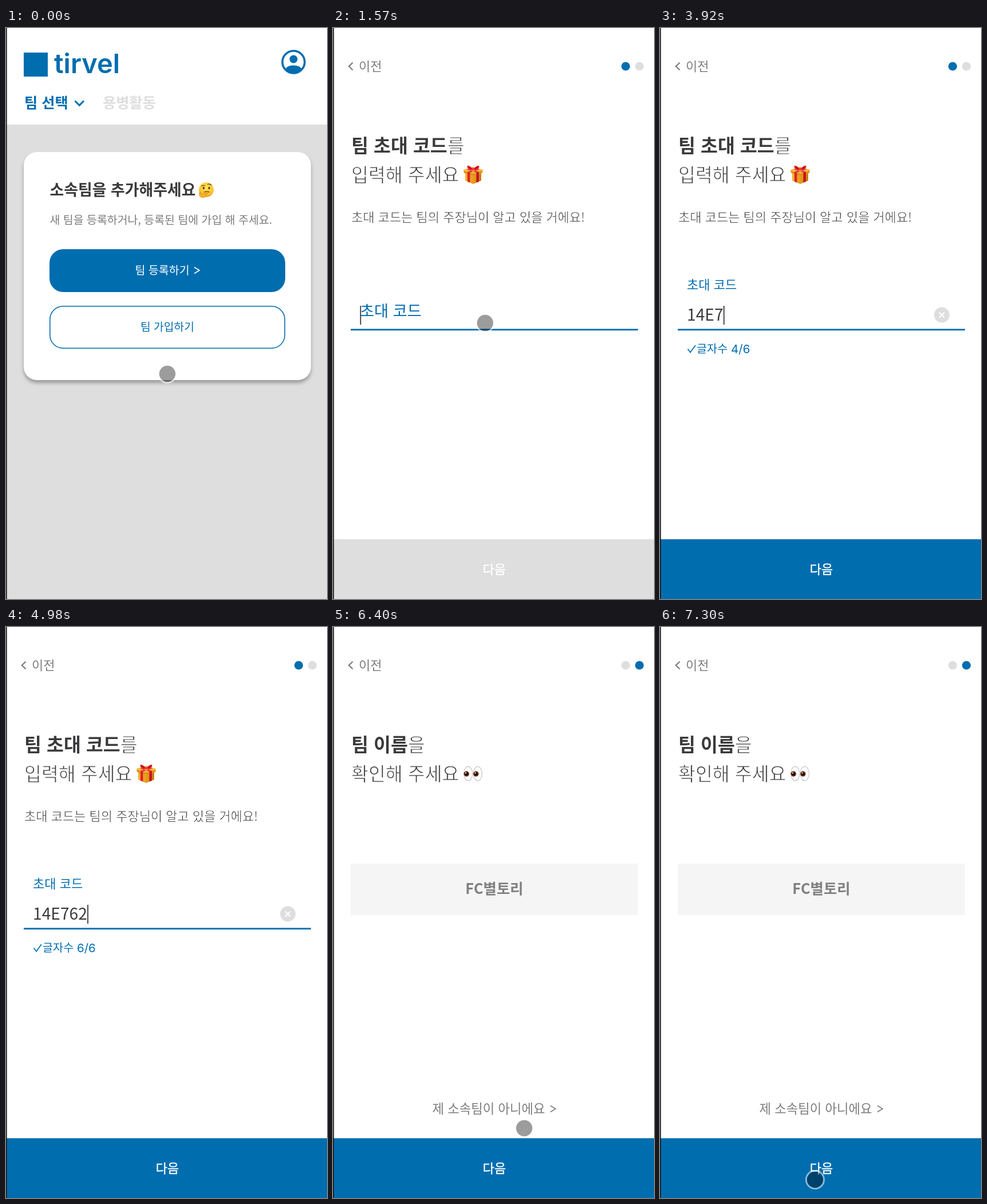
An HTML page for the animation above (8000 ms loop, 561 by 999 pixels).

```html
<!DOCTYPE html>
<html lang="ko">
<head>
<meta charset="utf-8">
<title>팀 가입</title>
<style>
html, body { margin: 0; width: 100%; height: 100%; overflow: hidden; background: #fff; }
svg { display: block; width: 100vw; height: 100vh; }
text { font-family: "Noto Sans CJK KR", "Noto Sans CJK", sans-serif; white-space: pre; }
.num { font-family: Inter, sans-serif; }
.card { filter: drop-shadow(0 5px 3px rgba(0, 0, 0, .3)); }
</style>
</head>
<body>
<svg id="stage" viewBox="0 0 561 999"></svg>
<script>
const LOOP = 8000;
const BLUE = '#006daf', DARK = '#3a3a3c', GRAY = '#7d7d7d', PALE = '#dedede';

// Text placed by its left edge (or centre) and its optical middle line
const label = (str, x, cy, size, fill, weight = 400, extra = '') =>
  `<text x="${x}" y="${cy + size * .375}" font-size="${size}" fill="${fill}" font-weight="${weight}" ${extra}>${str}</text>`;
const mid = (str, cy, size, fill, weight, extra = '') =>
  label(str, 282, cy, size, fill, weight, `text-anchor="middle" ${extra}`);
// A white outline trims regular strokes down to a light weight
const thin = size => `font-weight="400" stroke="#fff" stroke-width="${size * .027}"`;
const line = (d, stroke, width, extra = '') =>
  `<path d="${d}" fill="none" stroke="${stroke}" stroke-width="${width}" ${extra}/>`;
const arrow = (x, y, color) => line(`M${x} ${y - 5.5}L${x + 9} ${y}L${x} ${y + 5.5}`, color, 1.6);
const rect = (x, y, w, h, fill, extra = '') =>
  `<rect x="${x}" y="${y}" width="${w}" height="${h}" fill="${fill}" ${extra}/>`;
const dot = (x, y, r, fill, extra = '') =>
  `<circle cx="${x}" cy="${y}" r="${r}" fill="${fill}" ${extra}/>`;

const defs = `<defs>
  <radialGradient id="skin" cx=".5" cy=".35" r=".65">
    <stop offset="0" stop-color="#ffe45c"/><stop offset=".7" stop-color="#fdc62f"/><stop offset="1" stop-color="#ee9a1c"/>
  </radialGradient>
  <linearGradient id="wrap" x2="1">
    <stop offset="0" stop-color="#f3b32e"/><stop offset=".5" stop-color="#e79d1d"/><stop offset="1" stop-color="#c97a12"/>
  </linearGradient>
</defs>`;

const thinking = `<g transform="translate(350 283)">
  ${dot(0, 0, 12.8, 'url(#skin)')}
  <ellipse cx="-4.5" cy="-3" rx="1.5" ry="2.2" fill="#5b3410"/>
  <ellipse cx="5" cy="-3" rx="1.5" ry="2.2" fill="#5b3410"/>
  ${line('M-8 -6.5Q-5 -8.5 -2 -7M2 -9.5Q6 -11 9 -8', '#7a4a12', 1.3, 'stroke-linecap="round"')}
  ${line('M-3.5 4Q1 2.2 5 4', '#6b3c10', 1.4, 'stroke-linecap="round"')}
  <path d="M-12 5Q-11 2.5 -9.3 5L-8.4 8L1 5.4Q3.5 5.5 2 7.4L-2 9Q0 13 -5 13.5Q-11 14 -12 9Z" fill="#f8b62b" stroke="#d98216" stroke-width=".8"/>
</g>`;

const gift = `<g transform="translate(228 239)">
  <path d="M3 13L17 17L31 13V28L17 34L3 28Z" fill="url(#wrap)"/>
  <path d="M0 9L17 4L34 9L33 14.5L17 20L1 14.5Z" fill="#f6b93a"/>
  <path d="M.5 11L17 16L33.5 11L33 14.5L17 20L1 14.5Z" fill="#dc901c"/>
  <path d="M7 12.5L11.5 14V31.6L7 29.7Z" fill="#e0202a"/>
  <path d="M27 12.5L22.5 14V31.6L27 29.7Z" fill="#c5141e"/>
  <path d="M7 12.5L24 7L28 8.2L11.5 14ZM27 12.5L10 7L6 8.2L22.5 14Z" fill="#ee2f38"/>
  <path d="M17 8Q8 -1 6.5 3Q6 9 17 9Q28 9 27.5 3Q26 -1 17 8Z" fill="#e0202a"/>
  <path d="M15 7Q10.5 3 9 4.3Q9.500 7 15 7ZM19 7Q23.500 3 25 4.3Q24.500 7 19 7Z" fill="#9f0d17"/>
  ${dot(17, 8, 2.4, '#f23a42')}
</g>`;

const eye = x => `<ellipse cx="${x}" cy="256.5" rx="7.6" ry="12.3" fill="#fdfdfd" stroke="#c4c4c8" stroke-width="1.2"/>
  ${dot(x - 3, 257, 4.7, '#5e2d12')}${dot(x - 3, 257, 2.6, '#1c0c05')}${dot(x - 4.2, 255.4, 1.1, '#fff')}`;

const home = `<g id="home">
  ${rect(0, 169, 561, 830, PALE)}
  ${rect(31, 43, 42, 42, BLUE)}
  <text class="num" x="84" y="79" font-size="47" font-weight="600" fill="${BLUE}">tirvel</text>
  ${dot(502.5, 59.5, 19.5, 'none', `stroke="${BLUE}" stroke-width="3.6"`)}
  ${dot(502.5, 54.5, 6.9, BLUE)}
  <path d="M488 74C489 67 496 65.5 502.5 65.5S516 67 517 74A20 20 0 0 1 488 74Z" fill="${BLUE}"/>
  ${label('팀 선택', 32, 131, 25.2, BLUE, 700)}
  ${line('M120.5 127.5L128.3 135.3L136 127.5', BLUE, 3)}
  ${label('용병활동', 169, 131, 25.2, PALE, 700)}
  ${rect(31, 217, 502, 399, '#fff', 'rx="23" class="card"')}
  ${label('소속팀을 추가해주세요', 76.5, 283, 26.9, DARK, 700)}
  ${thinking}
  ${label('새 팀을 등록하거나, 등록된 팀에 가입 해 주세요.', 76.5, 335.5, 19.45, GRAY)}
  ${rect(76, 387, 412, 75, BLUE, 'rx="24"')}
  ${label('팀 등록하기', 225.5, 424, 19.5, '#fff')}
  ${arrow(329, 424, '#fff')}
  <g id="join">
    ${rect(76.8, 486.8, 410.4, 73.4, '#fff', `rx="23" stroke="${BLUE}" stroke-width="1.6"`)}
    ${mid('팀 가입하기', 522.5, 19.3, BLUE)}
  </g>
</g>`;

const bar = step => line('M34.5 60.5L27.8 67L34.5 73.5', GRAY, 2.3) +
  label('이전', 45, 66.5, 22, GRAY) +
  dot(511.5, 67, 7.6, step ? PALE : BLUE) + dot(535.5, 67, 7.6, step ? BLUE : PALE);
const heading = (bold, tail, second) =>
  label(`${bold}<tspan ${thin(32.5)}>${tail}</tspan>`, 32, 206, 32.5, DARK, 700) +
  label(second, 32, 257, 32.5, DARK, 400, thin(32.5));
const next = id => rect(0, 894.4, 561, 104.6, BLUE, id) +
  mid('다음', 947, 22, '#fff', 400, 'stroke="#fff" stroke-width=".35"');

const code = `<g id="code">
  ${bar(0)}${heading('팀 초대 코드', '를', '입력해 주세요')}${gift}
  ${label('초대 코드는 팀의 주장님이 알고 있을 거에요!', 32, 331, 22, DARK, 400, thin(22))}
  <text id="hint" x="47">초대 코드</text>
  ${label('', 47, 501.5, 28.2, DARK, 400, 'id="value"')}
  ${rect(0, 486, 1.8, 33, DARK, 'id="caret"')}
  ${rect(31, 526.4, 502, 2.8, BLUE, 'id="rule"')}
  <g id="typed">
    ${dot(492.5, 502, 13.5, PALE)}
    ${line('M488 497.5L497 506.5M497 497.5L488 506.5', '#fff', 2.2)}
    ${line('M48.5 561.5L53 567.5L62 555', BLUE, 1.7)}
    ${label('글자수', 64, 561, 19.7, BLUE)}
    ${label('', 124, 561, 20.5, BLUE, 400, 'id="count" class="num"')}
  </g>
  ${next('id="next"')}
</g>`;

const team = `<g id="team">
  ${bar(1)}${heading('팀 이름', '을', '확인해 주세요')}${eye(236.3)}${eye(252.9)}
  ${rect(31, 414, 502, 90, '#f5f5f5')}
  ${mid('FC별토리', 457.5, 25.4, '#808080', 700)}
  ${label('제 소속팀이 아니에요', 173.5, 842.5, 22.3, GRAY)}
  ${arrow(380, 843, GRAY)}
  ${next('')}
</g>`;

const pointer = `<g id="pointer">
  ${dot(0, 0, 15.6, 'none', 'stroke="#fff" stroke-opacity=".55" stroke-width="2.8"')}
  ${dot(0, 0, 14.2, '#000', 'fill-opacity=".39"')}
</g>`;

document.getElementById('stage').innerHTML =
  defs + rect(0, 0, 561, 999, '#fff') + home + code + team + rect(0, 0, 1.6, 999, '#1c1c1c') + pointer;

const el = {};
document.querySelectorAll('g[id], text[id], rect[id]').forEach(n => el[n.id] = n);

const TO_CODE = 1170, TO_TEAM = 6300, FOCUS = 1560;
const CODE = '14E762';
const keyTimes = [2030, 2270, 2920, 3920, 4120, 4980];
const caretOff = [[2760, 2920], [3520, 3920], [4610, 4980], [5470, 5970]];
const path = [
  [0, 282, 605], [199, 282, 605], [200, 282, 544], [670, 282, 544], [1100, 267.5, 534],
  [1230, 267, 530], [1370, 267, 530], [1730, 265, 505], [5390, 265, 505], [5750, 354, 760],
  [6100, 342.5, 879], [6170, 341, 911], [6320, 340, 911], [6600, 320, 793],
  [7000, 278, 945], [7300, 271, 967], [LOOP, 271, 967]
];

const clamp = v => Math.max(0, Math.min(1, v));
const mix = (a, b, k) => a + (b - a) * k;
const show = (node, on) => node.setAttribute('display', on ? 'inline' : 'none');
const within = (t, [a, b]) => t >= a && t < b;

function pointerAt(t) {
  const i = path.findIndex(p => p[0] > t);
  const [a, b] = [path[i - 1], path[i]];
  const k = (t - a[0]) / (b[0] - a[0]);
  return [mix(a[1], b[1], k), mix(a[2], b[2], k)];
}

function drawField(t) {
  const n = keyTimes.filter(k => k <= t).length;
  el.value.textContent = CODE.slice(0, n);
  el.count.textContent = n + '/6';
  show(el.typed, n > 0);
  el.next.setAttribute('fill', n ? BLUE : PALE);

  const focused = t >= FOCUS;
  const p = clamp((t - FOCUS) / 170), k = 1 - (1 - p) ** 2;
  const size = mix(28, 22, k);
  el.hint.setAttribute('font-size', size);
  el.hint.setAttribute('y', mix(501.5, 449, k) + size * .375);
  el.hint.setAttribute('fill', focused ? BLUE : '#c4c4c4');
  el.rule.setAttribute('fill', focused ? BLUE : PALE);

  el.caret.setAttribute('x', 47.3 + (n ? el.value.getComputedTextLength() : 0));
  show(el.caret, focused && !caretOff.some(r => within(t, r)));
}

function draw(t) {
  show(el.home, t < TO_CODE);
  show(el.code, within(t, [TO_CODE, TO_TEAM]));
  show(el.team, t >= TO_TEAM);
  el.join.setAttribute('opacity', mix(1, .2, clamp((t - 900) / 150)));
  if (within(t, [TO_CODE, TO_TEAM])) drawField(t);
  show(el.pointer, !within(t, [2030, 5390]));
  el.pointer.setAttribute('transform', `translate(${pointerAt(t)})`);
}

const start = performance.now();
function tick() {
  draw((performance.now() - start) % LOOP);
  requestAnimationFrame(tick);
}
tick();
</script>
</body>
</html>
```
